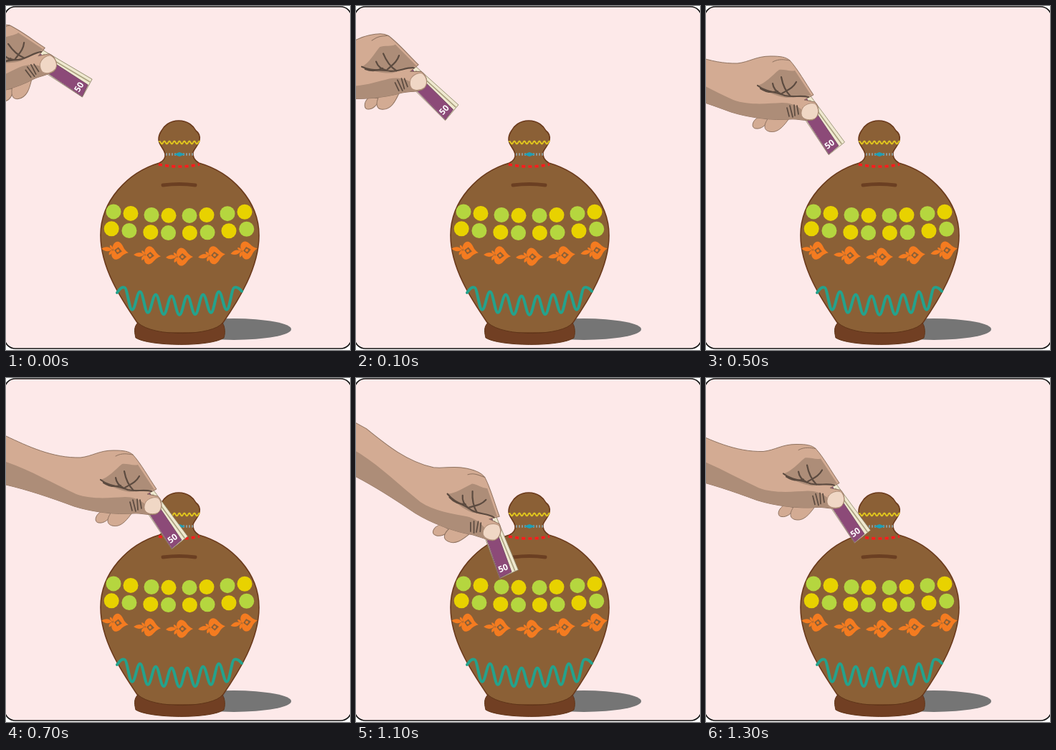
Recreate the animation shown at these times as an HTML page. Size 480 by 480 pixels, loop 1.5 s.

```html
<!DOCTYPE html>
<html lang="en">
<head>
<meta charset="utf-8">
<title>Savings pot</title>
<style>
html, body { margin: 0; width: 100%; height: 100%; overflow: hidden; background: #fff; }
svg { display: block; width: 100vw; height: 100vh; }
text { font: bold 12px "Open Sans", Arial, sans-serif; }
</style>
</head>
<body>
<svg viewBox="0 0 480 480" fill="none" stroke-linecap="round" stroke-linejoin="round">
  <defs>
    <clipPath id="potClip"><use href="#body"/></clipPath>
    <g id="bud" fill="#f47b20">
      <path d="M-21 1Q-13-6-6 0Q-13 6-21 1Z"/>
      <path d="M-5 0Q-11-2-10-6Q-5-5-5 0ZM-5 0Q-11 3-9 8Q-4 6-5 0Z"/>
      <path d="M-4 0C-9-6-3-15 3-12C9-9 8-4 17 0C8 4 9 9 3 12C-3 15-9 6-4 0Z"/>
      <path d="M-3 0L2-5L8 0L2 5Z" fill="#8b6036"/>
      <circle cx="2" r="2"/>
    </g>
  </defs>
  <rect id="card" x="-2" y="1" width="484" rx="15" fill="#fde9e9" stroke="#111" stroke-width="1.6"/>
  <g id="pot">
    <ellipse cx="318" cy="451" rx="80" ry="15" fill="#757575"/>
    <path id="body" fill="#8b6036" stroke="#6b3a1c" stroke-width="1.6" d="M241 160C254 160 262 168 265 174C269 177 271 182 270 187C269 194 263 198 261 204C260 211 264 216 269 219C315 232 353 272 353 320C353 365 325 410 302 443L302 456L184 456L184 443C160 408 132 365 132 320C132 272 170 232 214 219C220 216 223 212 222 206C220 198 213 194 213 186C213 181 215 177 217 174C220 168 228 160 241 160Z"/>
    <path fill="#713f23" stroke="#5f3519" d="M184 442C177 448 180 458 181 463C200 475 285 476 304 463C306 457 306 448 302 442C290 460 206 463 184 442Z"/>
    <path id="ripple" stroke="#e0c51e" stroke-width="2"/>
    <path d="M223 207H262" stroke="#8f9a98" stroke-width="3.4" stroke-dasharray="2 2" stroke-linecap="butt"/>
    <path d="M234 207L242 204L250 207L242 210Z" fill="#1f9fb4"/>
    <path d="M213 221Q241 227 270 221" stroke="#ff1c1c" stroke-width="3.6" stroke-dasharray="5 4.2" stroke-linecap="butt"/>
    <path d="M219 250Q242 247 264 250" stroke="#6b3f22" stroke-width="5"/>
    <g id="dots"></g>
    <g id="buds" clip-path="url(#potClip)"></g>
    <path id="zigzag" stroke="#24a28c" stroke-width="4"/>
  </g>
  <g id="hand">
    <g stroke="#8d8468" stroke-width=".8">
      <path fill="#efe9d0" d="M183 166L204 154L253.5 221L231.5 238.5Z"/>
      <path fill="#8c4a78" d="M180 158L199 158L245 226L231.5 237.5Z" stroke="#70405f"/>
      <path d="M205 163L249 223" stroke="#aaa27f" stroke-width="1.6"/>
    </g>
    <text x="232.5" y="228" fill="#fff" text-anchor="middle" transform="rotate(-36 232.5 224)">50</text>
    <g stroke="#8f7361" fill="#d3ab93">
      <path d="M133 186C123 192 123 202 130 202C136 203 144 198 147 190Z"/>
      <path d="M148 186C140 196 140 204 148 206C160 209 168 199 176 188Z"/>
      <path d="M-80 60L0 81C30 95 65 112 104 111C121 109 130 101 150 101C164 101 171 102 177 107C188 119 199 139 210 155L197 162L212 165C219 172 219 185 209 190C198 192 188 188 177 189C155 191 120 187 95 179C60 166 30 156 0 149L-80 128Z"/>
    </g>
    <path fill="#ad8d78" d="M-80 94L0 117C35 129 65 147 98 162C120 170 145 167 166 166C177 166 185 169 193 175C196 183 199 188 206 190C197 191 188 188 177 189C155 191 120 187 95 179C60 166 30 156 0 149L-80 128Z"/>
    <path fill="#ad8d78" d="M132 142C143 139 152 128 162 120C169 119 178 123 184 121L207 156L172 159C158 157 145 151 132 142Z"/>
    <path stroke="#8f7361" d="M153 109C162 104 170 106 177 107"/>
    <g stroke="#5c4b40" stroke-width="2.2">
      <path d="M132 142C145 152 156 150 170 156C182 159 192 155 203 158"/>
      <path d="M136 146C145 152 152 152 160 150"/>
      <path d="M165 130C167 141 171 150 178 157M186 137C181 146 174 148 166 153M153 139C154 146 158 151 165 154"/>
      <path stroke-width="1.7" d="M173 173L176 185M177 170L181 186M183 169L184 184M187 170L189 182"/>
    </g>
    <path fill="#f0d7c5" stroke="#b08f79" d="M195 173C199 167 209 165 213 168C218 174 218 183 212 188C206 191 197 190 194 185C192 181 193 177 195 173Z"/>
  </g>
</svg>
<script>
const $ = id => document.getElementById(id);
const MID = 243;

// Two rows of paired dots, bending up towards the rim
let dots = "";
for (let row = 0; row < 2; row++) {
  for (let i = 0; i < 8; i++) {
    const dx = (53 * (i >> 1) + 24 * (i % 2) - 93) * (1 + 0.03 * row);
    const y = 292.5 + 24.3 * row - 0.00065 * dx * dx;
    const color = (i + row) % 2 ? "#e8d200" : "#b5d63f";
    dots += `<circle cx="${MID + dx}" cy="${y}" r="10.5" fill="${color}"/>`;
  }
}
$("dots").innerHTML = dots;

let buds = "";
for (let k = -2; k <= 2; k++) {
  const place = `translate(${MID + 1 + 45 * k} ${350 - 2.2 * k * k}) rotate(${-5 * k})`;
  buds += `<use href="#bud" transform="${place}"/>`;
}
$("buds").innerHTML = buds;

let ripple = "M214 189";
for (let x = 215; x <= 270; x++) ripple += `L${x} ${190.5 - 2 * Math.cos((x - 214) * 0.9)}`;
$("ripple").setAttribute("d", ripple);

// Peaks at odd steps, troughs at even ones, both rising towards the sides
const STEP = 11;
const turnY = i => (i % 2 ? 405 - 0.25 * i * i : 431 - 0.2 * i * i);
let zigzag = `M155 400Q161 391 165 ${turnY(-7)}`;
for (let i = -6; i <= 7; i++) {
  const x = MID - 1 + STEP * i, bend = STEP * 0.4;
  zigzag += `C${x - STEP + bend} ${turnY(i - 1)} ${x - bend} ${turnY(i)} ${x} ${turnY(i)}`;
}
$("zigzag").setAttribute("d", zigzag + "Q323 391 329 398");

// Key poses of the hand: step, thumb x, thumb y, angle
const keys = [
  [0, 60, 82, -23],
  [2, 116, 130.5, 0],
  [3, 146, 148, 0],
  [4, 206, 179, 0],
  [6, 190.5, 215.5, 14],
  [7, 182, 170.5, 0]
];
const LOOP = 1500, HOLD = 200;

function poseAt(step) {
  const n = Math.max(1, keys.findIndex(k => k[0] >= step));
  const a = keys[n - 1], b = keys[n];
  const u = (step - a[0]) / (b[0] - a[0]);
  return a.map((v, i) => v + (b[i] - v) * u);
}

function draw(t) {
  const step = Math.floor((t + HOLD / 2) / HOLD);
  const [, x, y, angle] = poseAt(step);
  const jolt = 2 * Math.max(0, 1 - Math.abs(step - 2));
  $("hand").setAttribute("transform", `translate(${x} ${y}) rotate(${angle}) translate(-206 -179)`);
  $("pot").setAttribute("transform", `translate(${-jolt / 2} ${-jolt})`);
  $("card").setAttribute("height", 477 - jolt);
}

const start = performance.now();
function tick() {
  draw((performance.now() - start) % LOOP);
  requestAnimationFrame(tick);
}
tick();
</script>
</body>
</html>
```
